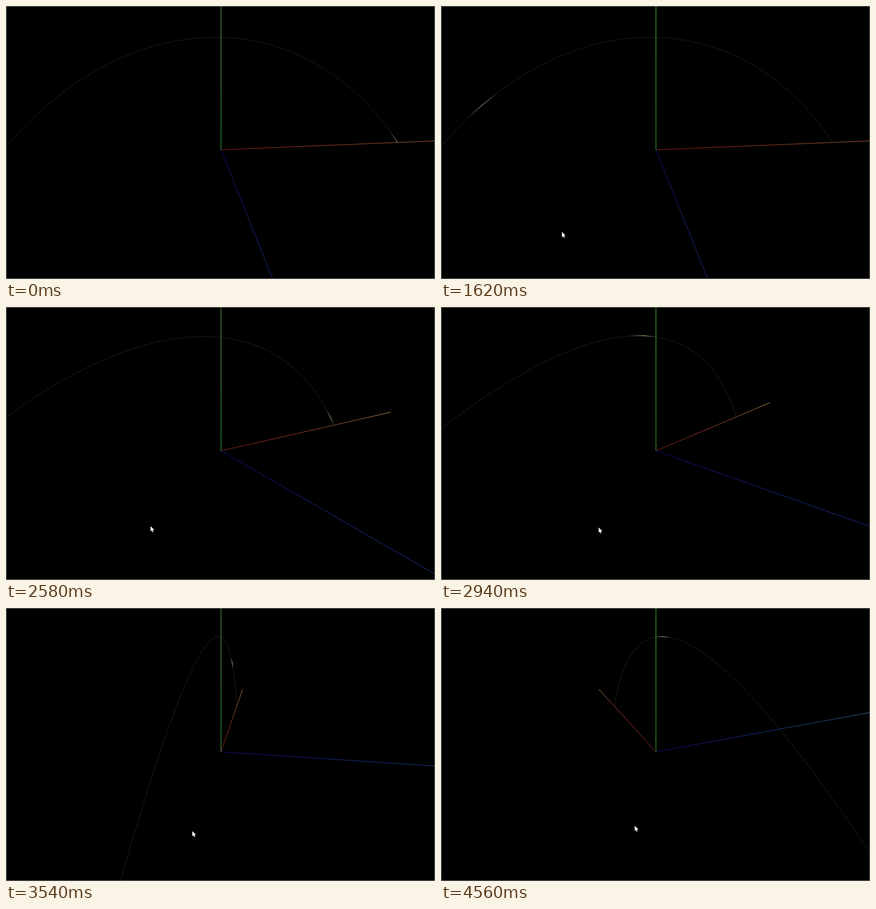
An HTML page with a canvas that plays this animation: 937 px wide and 597 px high, repeating every 4620 ms.

```html
<!DOCTYPE html>
<html lang="en">
<head>
<meta charset="utf-8">
<title>Pulse along an arc</title>
<style>
  html, body { margin: 0; width: 100%; height: 100%; overflow: hidden; background: #000; }
  canvas { display: block; }
</style>
</head>
<body>
<canvas id="stage" width="937" height="597"></canvas>
<script>
const ctx = document.getElementById('stage').getContext('2d');
const STEP = 60, STEPS = 77;
const CENTER = { x: 469.5, y: 314.5 };
const FOCAL = 436;          // camera distance is 1
const AXIS_LENGTH = 2;
const SEGMENTS = 30;
const BASE = [0.14, 0.14, 0.13], LIT = [0.95, 0.95, 0.4];
const POINTER_ENTERS = 24, POINTER_SETTLES = 33, POINTER_RETREATS = 69;

// Degrees turned by the drag, as [step, angle].
const DRAG = [[28, 0], [37, 12.4], [49, 40.2], [59, 74], [67, 95.9], [76, 104.9]];

const clamp01 = v => Math.min(1, Math.max(0, v));
const mix = (a, b, t) => a.map((v, i) => v + (b[i] - v) * t);
const radians = degrees => degrees * Math.PI / 180;

// Monotone cubic curve through [position, value] keys.
function smooth(keys, pos) {
  const last = keys.length - 1;
  const slope = k => (keys[k + 1][1] - keys[k][1]) / (keys[k + 1][0] - keys[k][0]);
  const tangent = k => {
    if (k === 0 || k === last) return 0;
    const a = slope(k - 1), b = slope(k);
    return a * b > 0 ? 2 * a * b / (a + b) : 0;
  };
  let i = 0;
  while (i < last - 1 && pos >= keys[i + 1][0]) i++;
  const size = keys[i + 1][0] - keys[i][0];
  const t = clamp01((pos - keys[i][0]) / size), s = 1 - t;
  return (1 + 2 * t) * s * s * keys[i][1] + t * s * s * size * tangent(i)
    + t * t * (3 - 2 * t) * keys[i + 1][1] - t * t * s * size * tangent(i + 1);
}

// The pulse starts a little slow and settles at a steady pace.
function pulseIndex(step) {
  const travelled = step * (2.267 - 0.6 * Math.exp(-step / 20));
  return Math.round(travelled) % (SEGMENTS + 1);
}

// Thin lines lose half of their chroma.
function toCss(color) {
  const luma = 0.299 * color[0] + 0.587 * color[1] + 0.114 * color[2];
  return `rgb(${color.map(v => Math.round(255 * (v + luma) / 2)).join(',')})`;
}

function makeCamera(drag, lift) {
  const theta = radians(-7.37 - drag), phi = radians(18.84 + lift);
  const ct = Math.cos(theta), st = Math.sin(theta);
  const cp = Math.cos(phi), sp = Math.sin(phi);
  return ([x, y, z]) => {
    const near = x * st + z * ct;
    const depth = 1 - near * cp - y * sp;
    return {
      x: CENTER.x + FOCAL * (x * ct - z * st) / depth,
      y: CENTER.y - FOCAL * (y * cp - near * sp) / depth,
      depth
    };
  };
}

// Line from a to b, shaded with perspective.
function shadedLine(project, a, b, colorA, colorB) {
  const p = project(a), q = project(b);
  const gradient = ctx.createLinearGradient(p.x, p.y, q.x, q.y);
  for (let k = 0; k <= 16; k++) {
    const s = k / 16;
    const t = s * p.depth / (s * p.depth + (1 - s) * q.depth);
    gradient.addColorStop(s, toCss(mix(colorA, colorB, t)));
  }
  ctx.strokeStyle = gradient;
  ctx.beginPath();
  ctx.moveTo(p.x, p.y);
  ctx.lineTo(q.x, q.y);
  ctx.stroke();
}

// The part of an axis that comes too near the camera is cut off.
function drawAxis(project, dir, endColor) {
  const far = dir.map(v => v * AXIS_LENGTH);
  const farDepth = project(far).depth;
  const minDepth = 0.15;
  const cut = farDepth < minDepth ? (1 - minDepth) / (1 - farDepth) : 1;
  shadedLine(project, [0, 0, 0], far.map(v => v * cut), dir, mix(dir, endColor, cut));
}

function arcPoint(i) {
  const x = 1 - 2 * i / SEGMENTS;
  return [x, (1 - x * x) / 2, 0];
}

function drawArc(project, lit) {
  ctx.strokeStyle = toCss(BASE);
  ctx.beginPath();
  for (let i = 0; i <= SEGMENTS; i++) {
    const p = project(arcPoint(i));
    ctx.lineTo(p.x, p.y);
  }
  ctx.stroke();
  for (const next of [lit - 1, lit + 1]) {
    if (next >= 0 && next <= SEGMENTS) {
      shadedLine(project, arcPoint(lit), arcPoint(next), LIT, BASE);
    }
  }
}

// The pointer enters from below, follows the drag and draws back at the end.
function drawPointer(step, drag, lift) {
  if (step < POINTER_ENTERS) return;
  const entry = clamp01((POINTER_SETTLES - step) / (POINTER_SETTLES - POINTER_ENTERS)) ** 4;
  const retreat = clamp01((step - POINTER_RETREATS) / (STEPS - 1 - POINTER_RETREATS));
  const x = 270 + 1.85 * drag - 30 * entry - 41 * retreat;
  const y = 475 + 1.8 * lift + 96 * entry - 13 * retreat;
  const outline = [[0, 0], [0, 11.5], [2.6, 9.2], [4.4, 13.2], [6.2, 12.4], [4.5, 8.5], [8, 8.2]];
  ctx.fillStyle = '#fff';
  ctx.beginPath();
  outline.forEach(([dx, dy]) => ctx.lineTo(x + dx, y + dy));
  ctx.fill();
}

function draw(step) {
  const drag = smooth(DRAG, step);
  const lift = Math.min(7.86, 0.097 * drag);
  const project = makeCamera(drag, lift);
  ctx.fillStyle = '#000';
  ctx.fillRect(0, 0, 937, 597);
  ctx.lineWidth = 1;
  drawArc(project, pulseIndex(step));
  drawAxis(project, [1, 0, 0], [1, 0.6, 0]);
  drawAxis(project, [0, 0, 1], [0, 0.6, 1]);
  drawAxis(project, [0, 1, 0], [0.6, 1, 0]);
  drawPointer(step, drag, lift);
  ctx.strokeStyle = '#8c8c8c';
  ctx.strokeRect(0.5, 0.5, 936, 596);
}

const start = performance.now();
function tick() {
  const elapsed = performance.now() - start;
  draw(Math.floor(elapsed / STEP) % STEPS);
  requestAnimationFrame(tick);
}
tick();
</script>
</body>
</html>
```
